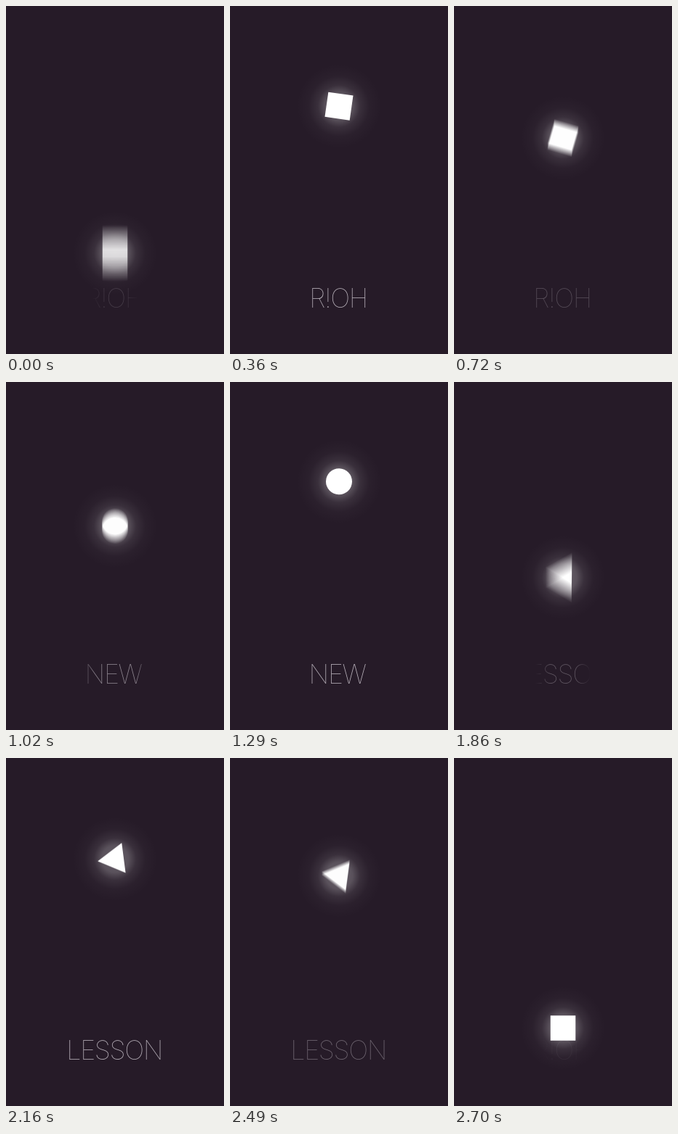
These frames come from a looping animation (300 px wide and 480 px high, 2730 ms). An HTML page with a canvas:

```html
<!DOCTYPE html>
<html lang="en">
<head>
<meta charset="utf-8">
<title>Bouncing shapes</title>
<style>
  html, body { margin: 0; height: 100%; overflow: hidden; background: #261b28; }
  canvas { display: block; }
</style>
</head>
<body>
<canvas id="stage" width="300" height="480"></canvas>
<script>
const stage = document.getElementById('stage');
const ctx = stage.getContext('2d');
const layer = stage.cloneNode().getContext('2d');

const LOOP = 2730, BEAT = 910, STEP = 30;
const OFFSET = 38;                    // time into the first beat at load, ms
const REST = 24, DECAY = 95;          // pause on the floor and bounce time constant, ms
const CENTER = 150, TOP = 133.5, FLOOR = 372.5;
const SPIN = 0.7725 * Math.PI / 180;  // radians per ms
const SHUTTER = 10;                   // half exposure for motion blur, ms

const clamp = (v, lo, hi) => Math.min(hi, Math.max(lo, v));

const scenes = [
  { word: 'R!OH', trace: c => c.rect(-17.25, -17.25, 34.5, 34.5) },
  { word: 'NEW', trace: c => c.arc(0, 0, 18, 0, 2 * Math.PI) },
  { word: 'LESSON', trace: c => {
    for (let i = 0; i < 3; i++) {
      const a = (i / 3 * 2 - 0.5) * Math.PI;
      c.lineTo(24 * Math.cos(a), 24 * Math.sin(a));
    }
    c.closePath();
  } }
];

// Exponential rise off the floor, mirrored on the way down.
function heightAt(q) {
  const gap = Math.min(Math.max(0, q - REST), BEAT - q);
  return TOP + (FLOOR - TOP) * Math.exp(-gap / DECAY);
}

// The word spreads out from its middle, then fades.
function drawWord(word, q) {
  const alpha = Math.min(0.04 + q / 220, 1, (850 - q) / 280);
  if (alpha <= 0) return;
  const reach = 26 + 0.15 * q;
  const edge = 20 / (2 * reach);
  const ink = ctx.createLinearGradient(CENTER - reach, 0, CENTER + reach, 0);
  ink.addColorStop(0, 'rgba(222,216,224,0)');
  ink.addColorStop(edge, 'rgba(222,216,224,.8)');
  ink.addColorStop(1 - edge, 'rgba(222,216,224,.8)');
  ink.addColorStop(1, 'rgba(222,216,224,0)');
  ctx.save();
  ctx.globalAlpha = alpha;
  ctx.fillStyle = ink;
  ctx.font = '100 36px Inter, Roboto, sans-serif';
  ctx.letterSpacing = '-1.4px';
  const box = ctx.measureText(word);
  const middle = (box.actualBoundingBoxRight - box.actualBoundingBoxLeft) / 2;
  ctx.fillText(word, CENTER - middle, 416);
  ctx.restore();
}

function drawGlow(y) {
  const glow = ctx.createRadialGradient(CENTER, y, 0, CENTER, y, 58);
  glow.addColorStop(0, 'rgba(255,255,255,.3)');
  glow.addColorStop(0.32, 'rgba(255,255,255,.24)');
  glow.addColorStop(0.5, 'rgba(255,255,255,.09)');
  glow.addColorStop(0.72, 'rgba(255,255,255,.025)');
  glow.addColorStop(1, 'rgba(255,255,255,0)');
  ctx.fillStyle = glow;
  ctx.fillRect(CENTER - 60, y - 60, 120, 120);
}

// Vertical motion blur: average the shape over the exposure.
function drawShape(trace, q) {
  const from = clamp(q - SHUTTER, 0, BEAT);
  const to = clamp(q + SHUTTER, 0, BEAT);
  const travel = Math.abs(heightAt(to) - heightAt(from));
  const count = clamp(Math.ceil(travel), 1, 32);
  drawGlow((heightAt(from) + heightAt(to)) / 2);
  layer.clearRect(0, 0, 300, 480);
  layer.globalCompositeOperation = 'lighter';
  layer.globalAlpha = 1 / count;
  layer.fillStyle = '#fff';
  for (let i = 0; i < count; i++) {
    layer.save();
    layer.translate(CENTER, heightAt(from + (to - from) * (i + 0.5) / count));
    layer.rotate(SPIN * Math.max(0, q - OFFSET));
    layer.beginPath();
    trace(layer);
    layer.fill();
    layer.restore();
  }
  ctx.drawImage(layer.canvas, 0, 0);
}

function draw(now) {
  const t = (Math.floor(now / STEP) * STEP + OFFSET) % LOOP;
  const scene = scenes[Math.floor(t / BEAT)];
  const q = t % BEAT;
  ctx.fillStyle = '#261b28';
  ctx.fillRect(0, 0, 300, 480);
  drawWord(scene.word, q);
  drawShape(scene.trace, q);
}

const start = performance.now();
function tick() {
  draw(performance.now() - start);
  requestAnimationFrame(tick);
}
tick();
</script>
</body>
</html>
```
